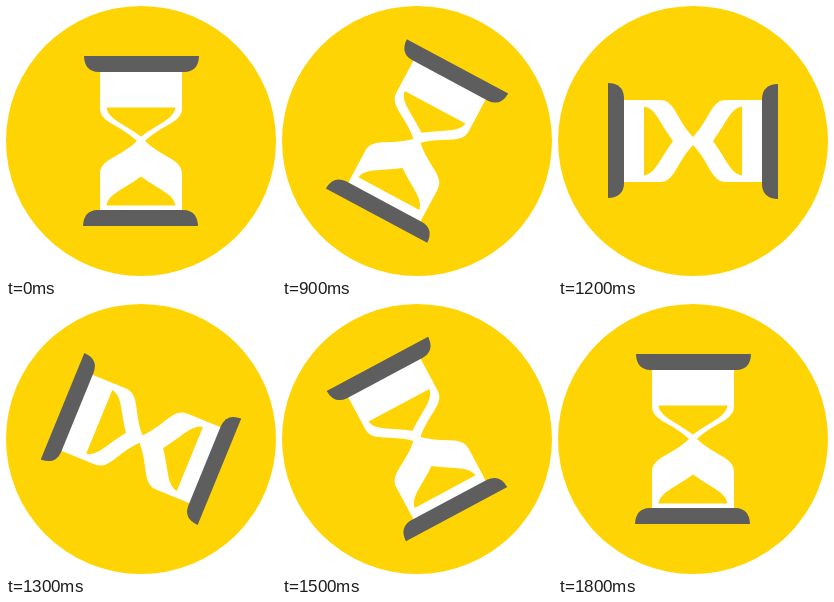
An HTML page that plays this animation: 270x270 px, repeating every 2.4 s.

```html
<!DOCTYPE html>
<html lang="en">
<head>
<meta charset="utf-8">
<title>Hourglass</title>
<style>
  html, body { margin: 0; width: 100%; height: 100%; overflow: hidden; background: #fff; }
  svg { display: block; width: 100%; height: 100%; }
</style>
</head>
<body>
<svg viewBox="-135 -135 270 270">
  <defs>
    <path id="bar" d="M-57.5 85H57.5Q57 69.5 43 69H-43Q-57 69.5 -57.5 85Z" fill="#5e5e5e"/>
    <path id="sand" d="M-34.5 33.5C-32.5 22 -20 19 0 4.5C20 19 32.5 22 34.5 33.5Z" fill="#ffd404"/>
  </defs>
  <circle r="135" fill="#ffd404"/>
  <g id="hourglass">
    <path fill="#fff" d="M-41 -70H41V-33C41 -18 22 -17 4 0C22 17 41 18 41 33V70H-41V33C-41 18 -22 17 -4 0C-22 -17 -41 -18 -41 -33Z"/>
    <use href="#bar" x="-.5"/>
    <use href="#bar" x="-.5" transform="rotate(180)"/>
    <use href="#sand" id="lower"/>
    <use href="#sand" id="upper"/>
  </g>
</svg>
<script>
  const LOOP = 2400, TURN_START = 600, STEP = 100, STEPS = 12, SAND_TRAVEL = 31;
  const [hourglass, lower, upper] =
    ['hourglass', 'lower', 'upper'].map(id => document.getElementById(id));
  const smooth = x => x * x * (3 - 2 * x);

  function draw(now) {
    const step = Math.floor((now % LOOP - TURN_START) / STEP);
    const turn = smooth(Math.min(STEPS, Math.max(0, step)) / STEPS);
    hourglass.setAttribute('transform', `rotate(${180 * turn})`);
    // Both chambers' sand slides along the axis while the glass turns over.
    lower.setAttribute('transform', `translate(0 ${SAND_TRAVEL * (1 - turn)})`);
    upper.setAttribute('transform', `rotate(180) translate(0 ${SAND_TRAVEL * turn})`);
  }

  const start = performance.now();
  function tick() {
    draw(performance.now() - start);
    requestAnimationFrame(tick);
  }
  tick();
</script>
</body>
</html>
```
